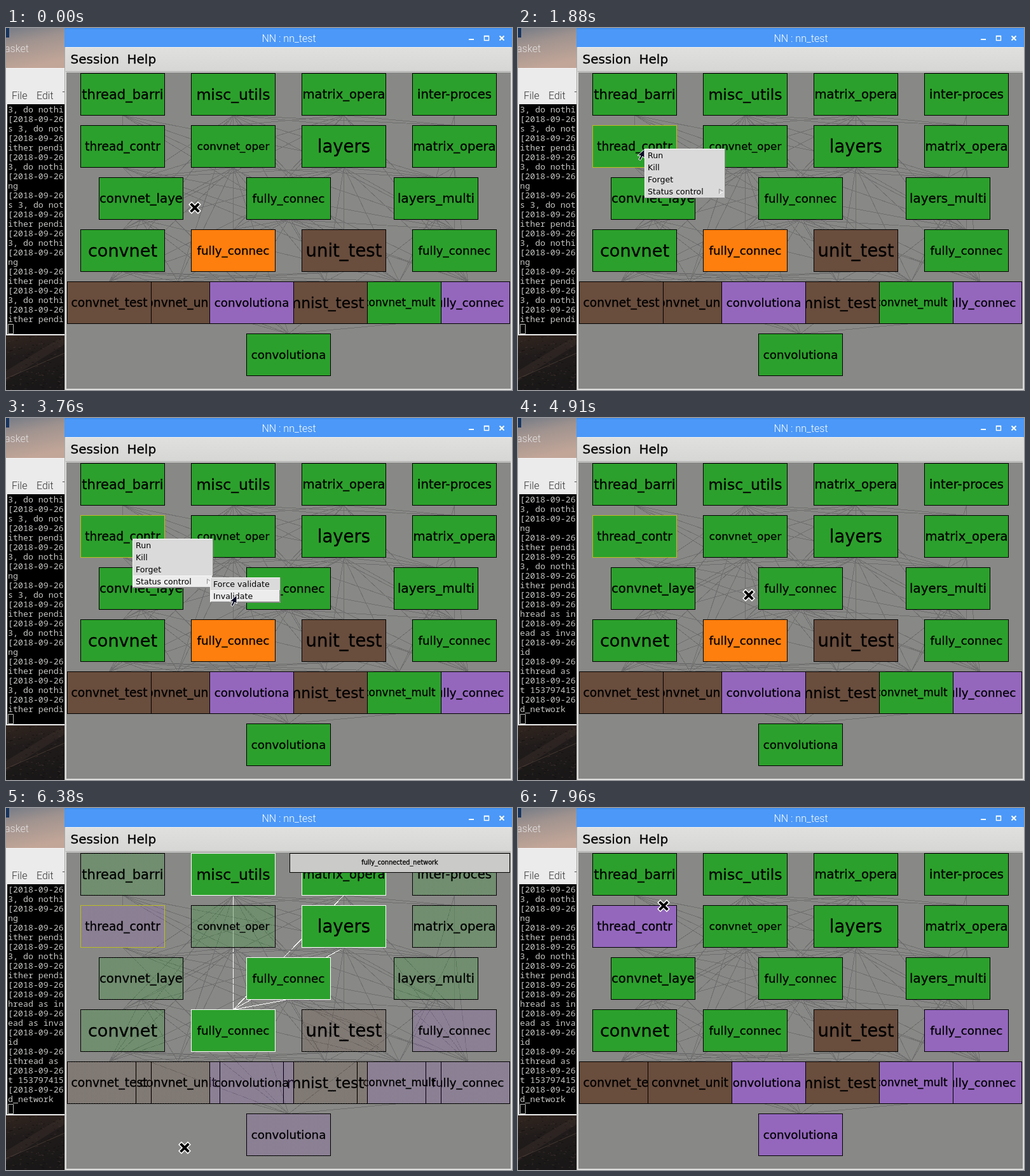
Animation of 796x570 px, one loop 8000 ms. Source, as an HTML page:

```html
<!DOCTYPE html>
<html lang="en">
<head>
<meta charset="utf-8">
<title>Task graph</title>
<style>
html, body { margin: 0; width: 100%; height: 100%; overflow: hidden; background: #888; }
svg { display: block; }
text { font-family: "DejaVu Sans", sans-serif; white-space: pre; }
.ui { font-family: Roboto, sans-serif; font-weight: 300; }
.mono { font: 13.3px "Noto Sans Mono", monospace; fill: #c4c6c2; }
.firm { stroke: #000; stroke-width: .3; }
</style>
</head>
<body>
<svg id="stage" width="796" height="570" viewBox="0 0 796 570">
  <defs id="defs">
    <linearGradient id="sky" x2="0.3" y2="1">
      <stop offset="0" stop-color="#757b86"/><stop offset=".4" stop-color="#a0938f"/><stop offset="1" stop-color="#c2a698"/>
    </linearGradient>
    <linearGradient id="road" x2="0.2" y2="1">
      <stop offset="0" stop-color="#33261f"/><stop offset=".4" stop-color="#211c1b"/><stop offset="1" stop-color="#191717"/>
    </linearGradient>
    <linearGradient id="bar" x2="0" y2="1">
      <stop offset="0" stop-color="#e0e0de"/><stop offset="1" stop-color="#d6d6d4"/>
    </linearGradient>
  </defs>
  <g id="desk"></g>
  <g id="term"></g>
  <g id="win"></g>
  <g id="edges" shape-rendering="crispEdges"></g>
  <g id="nodes"></g>
  <g id="tip"></g>
  <g id="menus"></g>
  <g id="pointer"></g>
</svg>
<script>
const LOOP = 8000;
const GREEN = '#2ca02c', ORANGE = '#ff7f0e', BROWN = '#694d3d', PURPLE = '#9467bd', OLIVE = '#bcbd22';
const $ = id => document.getElementById(id);

function add(parent, tag, attrs, text) {
  const el = document.createElementNS('http://www.w3.org/2000/svg', tag);
  set(el, attrs);
  if (text !== undefined) el.textContent = text;
  parent.appendChild(el);
  return el;
}
function set(el, attrs) {
  for (const k in attrs) el.setAttribute(k, attrs[k]);
}
const box = (p, x, y, width, height, fill, extra) => add(p, 'rect', { x, y, width, height, fill, ...extra });
const path = (p, d, attrs) => add(p, 'path', { d, fill: 'none', ...attrs });
const label = (p, x, y, size, str, extra) => add(p, 'text', { x, y, 'font-size': size, ...extra }, str);
const show = (el, on) => el.setAttribute('display', on ? 'inline' : 'none');

// Quarter-density stipple in each node colour
const stippleId = color => 'dots' + color.slice(1);
for (const fill of [GREEN, ORANGE, BROWN, PURPLE]) {
  const p = add($('defs'), 'pattern', {
    id: stippleId(fill), width: 4, height: 2, patternUnits: 'userSpaceOnUse', 'shape-rendering': 'crispEdges'
  });
  path(p, 'M3 0h1v1h-1zM1 1h1v1h-1z', { fill });
}

// Desktop
const desk = $('desk');
box(desk, 0, 0, 92, 64, 'url(#sky)');
box(desk, 0, 0, 5, 15, '#17345f');
label(desk, -2, 38, 16, 'asket', { class: 'ui', fill: '#e4e2e2' });
box(desk, 0, 483, 92, 87, 'url(#road)');
path(desk, 'M92 484L0 540V556L92 498Z', { fill: '#44362f', opacity: .35 });
path(desk, 'M92 512L0 552', { stroke: '#6a5648', opacity: .5 });
let seed = 7;
const rnd = () => (seed = seed * 16807 % 2147483647) / 2147483647;
for (let i = 0; i < 140; i++) {
  box(desk, rnd() * 92, 485 + rnd() * 84, 1 + rnd() * 3, 1, i % 2 ? '#463a35' : '#0e0c0c', { opacity: .6 });
}

// Terminal
const term = $('term');
box(term, 0, 63, 92, 421, '#ebebeb');
path(term, 'M0 63.5H92', { stroke: '#f8f8f8' });
['File', 'Edit', 'T'].forEach((s, i) =>
  label(term, [9, 48, 88.5][i], 112, 16, s, { class: 'ui', fill: '#333' }));
box(term, 2, 120, 90, 362, '#000');
const DATE = '[2018-09-26', NONE = '3, do nothi', SKIP = 's 3, do not', PEND = 'ither pendi';
const LOG = [NONE, DATE, SKIP, DATE, PEND, DATE, NONE, DATE, 'ng', DATE, SKIP, DATE, PEND, DATE, NONE,
  DATE, 'ng', DATE, PEND, DATE, NONE, DATE, PEND, DATE, DATE, 'hread as in', DATE, 'ead as inva',
  DATE, 'id', DATE, 'ithread as ', DATE, 't 153797415', DATE, 'd_network'];
const rows = Array.from({ length: 23 }, (_, i) => add(term, 'text', { x: 3, y: 133 + i * 15, class: 'mono' }));
path(term, 'M3.5 466.5h8v15h-8z', { stroke: '#c4c6c2' });

// Application window
const win = $('win');
box(win, 92, 0, 704, 570, '#dededc');
path(win, 'M92.5 30V570', { stroke: '#a9a9a9' });
box(win, 92, 0, 704, 30, '#4b98f8');
box(win, 92, 0, 704, 2, '#418ff0');
label(win, 445, 22, 16, 'NN : nn_test', { class: 'ui', fill: '#fff', 'text-anchor': 'middle' });
box(win, 728, 17, 8, 2, '#fff');
path(win, 'M752.5 12.5h7v7h-7zM752 13h8', { stroke: '#fff', 'stroke-width': 1.4 });
path(win, 'M776.5 12.5l7 7m0-7l-7 7', { stroke: '#fff', 'stroke-width': 2 });
box(win, 94, 30, 700, 39, 'url(#bar)');
path(win, 'M94 30.5H794', { stroke: '#f2f2f0' });
path(win, 'M94 68.5H794', { stroke: '#a4a4a2' });
label(win, 101.5, 56, 20, 'Session', { class: 'firm' });
label(win, 190.5, 56, 20, 'Help', { class: 'firm' });
box(win, 95, 70, 699, 498, '#888886');

// Graph: key, label, font size, left, top, colour; listed from back to front
const BOXES = [
  ['a', 'thread_barri', 21, 117, 71, GREEN], ['b', 'misc_utils', 23.6, 291, 71, GREEN],
  ['c', 'matrix_opera', 19.6, 465, 71, GREEN], ['d', 'inter-proces', 19.7, 639, 71, GREEN],
  ['e', 'thread_contr', 18.6, 117, 153, GREEN], ['f', 'convnet_oper', 16.7, 291, 153, GREEN],
  ['g', 'layers', 27.5, 465, 153, GREEN], ['h', 'matrix_opera', 19.6, 639, 153, GREEN],
  ['i', 'convnet_laye', 19.8, 146, 235, GREEN], ['j', 'fully_connec', 18.3, 378, 235, GREEN],
  ['k', 'layers_multi', 19.9, 610, 235, GREEN],
  ['l', 'convnet', 27.1, 117, 317, GREEN], ['m', 'fully_connec', 18.3, 291, 317, ORANGE],
  ['n', 'unit_test', 27.5, 465, 317, BROWN], ['o', 'fully_connec', 18.3, 639, 317, GREEN],
  ['u', 'fully_connec', 18.3, 660, 399, PURPLE], ['t', 'convnet_mult', 16.8, 552, 399, GREEN],
  ['s', 'mnist_test', 23.4, 436, 399, BROWN], ['q', 'convnet_unit', 18.7, 204, 399, BROWN],
  ['p', 'convnet_test', 18.6, 96, 399, BROWN], ['r', 'convolutiona', 18.3, 320, 399, PURPLE],
  ['v', 'convolutiona', 18.3, 378, 481, GREEN]
];
const nodes = {};
for (const [key, name, size, x, y, color] of BOXES) {
  const g = add($('nodes'), 'g', {});
  const rect = box(g, x + .5, y + .5, 132, 66, color, { 'shape-rendering': 'crispEdges' });
  label(g, x + 66.5, y + 33.5 + size * .346, size, name, { 'text-anchor': 'middle', class: 'firm' });
  nodes[key] = { g, rect, x: x + 66.5, y: y + .5, color };
}
const LINKS = {
  a: 'ekotu', b: 'fghijklmnopqs', c: 'fghijlmnou', d: 'hko', e: 'otuv', f: 'iklpqstv',
  g: 'ijklmnopstu', h: 'kotu', i: 'lpqrtv', j: 'mnopqrsu', k: 'otuv', l: 'pqrstv',
  n: 'pqs', o: 'u', r: 'v', t: 'v'
};
const edges = [];
for (const from in LINKS) for (const to of LINKS[from]) {
  const p = nodes[from], c = nodes[to];
  edges.push({ from, to, el: path($('edges'), `M${p.x} ${p.y + 66}L${c.x} ${c.y}`, { stroke: '#6f6f6f' }) });
}
const linked = (a, b) => a === b || (LINKS[a] || '').includes(b) || (LINKS[b] || '').includes(a);

const tip = $('tip');
box(tip, 446.5, .5, 346, 30, '#cacac8', { stroke: '#000', 'shape-rendering': 'crispEdges' });
const tipText = label(tip, 619.5, 18, 9.7, '', { 'text-anchor': 'middle', class: 'firm' });

// Popup menus
function raised(p, x, y, w, h, fill) {
  box(p, x, y, w, h, fill);
  path(p, `M${x + .5} ${y + h}V${y + .5}H${x + w}`, { stroke: '#f8f8f8' });
  path(p, `M${x} ${y + h - .5}H${x + w - .5}V${y}`, { stroke: '#8a8a8a' });
}
function makeMenu(x, y, w, items) {
  const g = add($('menus'), 'g', {});
  raised(g, x, y, w, items.length * 19 + 2, '#dadada');
  const marks = items.map((s, i) => {
    const mark = add(g, 'g', {});
    raised(mark, x + 1, y + 1 + i * 19, w - 2, 19, '#ececec');
    label(g, x + 5, y + 14.5 + i * 19, 12.6, s);
    return mark;
  });
  return { g, pick: row => marks.forEach((m, i) => show(m, i === row)) };
}
const menu = makeMenu(199, 190, 127, ['Run', 'Kill', 'Forget', 'Status control']);
path(menu.g, 'M316.5 261.5V253.5L323 257.5', { stroke: '#8c8c8c' });
path(menu.g, 'M316.5 261.5L323 257.5', { stroke: '#fff' });
const sub = makeMenu(321, 251, 111, ['Force validate', 'Invalidate']);

// Pointers
const pointer = $('pointer');
const cross = add(pointer, 'g', {});
for (const [stroke, width] of [['#fff', 7], ['#000', 4]]) {
  path(cross, 'M-5 -5L5 5M5 -5L-5 5', { stroke, 'stroke-width': width, 'stroke-linecap': 'square' });
}
const arrow = path(pointer, 'M0 0V14L-3 11L-6.5 17.5L-9 16L-6 10H-11Z', { fill: '#0b0b24', stroke: '#fff' });

// start, end, steps, x, y
const MOVES = [
  [80, 460, 6, 200, 191], [1720, 1720, 1, 199, 191], [2190, 2630, 7, 250, 258],
  [2800, 3200, 6, 391, 261], [3350, 3760, 6, 363, 279], [5680, 6220, 8, 281, 535],
  [6550, 6710, 3, 276, 540], [7090, 7410, 5, 268, 544], [7800, 7800, 1, 335, 420],
  [7880, 7880, 1, 209, 260], [7960, 7960, 1, 229, 154]
];
function pointerAt(t) {
  let x = 297, y = 283;
  for (const [t0, t1, n, toX, toY] of MOVES) {
    if (t < t0) break;
    const gap = (t1 - t0) / (n - 1) || 1;
    const k = Math.min(n, Math.floor((t - t0) / gap + 1e-6) + 1);
    const f = 1 - (1 - k / n) ** 2;
    x += (toX - x) * f;
    y += (toY - y) * f;
  }
  return [Math.round(x), Math.round(y)];
}

// start, end, node, tooltip, tooltip top
const HOVERS = [
  [160, 380, 'i', 'convnet_layers', 537],
  [460, 1880, 'e', 'thread_control', 537],
  [5760, 6470, 'm', 'fully_connected_network', 71]
];

function colorAt(key, t) {
  if (t >= 4980 && 'eotv'.includes(key)) return PURPLE;
  if (t >= 5680 && key === 'm') return GREEN;
  return nodes[key].color;
}

function render(t) {
  const hover = HOVERS.find(h => t >= h[0] && t < h[1]);
  const focus = hover && hover[2];
  const chosen = t >= 1310 && t < 6550;
  for (const key in nodes) {
    const on = !focus || linked(focus, key);
    const color = colorAt(key, t);
    set(nodes[key].rect, {
      fill: on ? color : `url(#${stippleId(color)})`,
      stroke: key === 'e' && chosen ? OLIVE : focus && on ? '#fff' : '#000'
    });
  }
  const { g } = nodes.q, before = t >= 6470 ? null : nodes.p.g;
  if (g.nextSibling !== before) $('nodes').insertBefore(g, before);
  for (const { from, to, el } of edges) {
    el.setAttribute('stroke', focus && (from === focus || to === focus) ? '#fff' : '#6f6f6f');
  }
  show(tip, hover);
  if (hover) {
    tipText.textContent = hover[3];
    tip.setAttribute('transform', `translate(0 ${hover[4]})`);
  }

  const skip = t >= 4840 ? 13 : 0;
  rows.forEach((r, i) => r.textContent = LOG[i + skip]);

  const [x, y] = pointerAt(t);
  const open = t >= 1720 && t < 4600;
  const row = x <= 200 ? -1 : x > 321 ? 3 : Math.min(3, Math.floor((y - 191) / 19));
  show(menu.g, open);
  menu.pick(row);
  show(sub.g, open && row === 3);
  sub.pick(x < 323 ? -1 : y < 271 ? 0 : 1);
  show(arrow, open);
  show(cross, !open);
  pointer.setAttribute('transform', `translate(${x} ${y})`);
}

function tick() {
  render(performance.now() % LOOP);
  requestAnimationFrame(tick);
}
tick();
</script>
</body>
</html>
```
